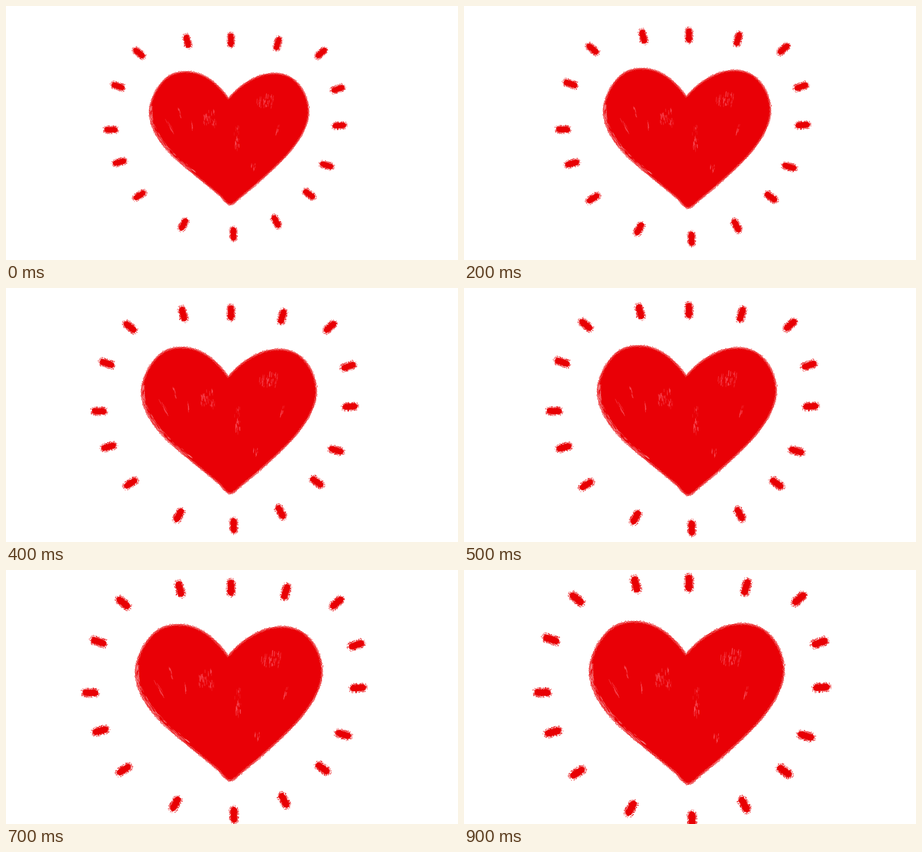
Animation of 768x432 px, one loop 1 s. Source, as an HTML page with a canvas:

```html
<!DOCTYPE html>
<html lang="en">
<head>
<meta charset="utf-8">
<title>Crayon heart</title>
<style>
  html, body { margin: 0; width: 100%; height: 100%; overflow: hidden; background: #fff; }
  canvas { display: block; width: 768px; height: 432px; }
</style>
</head>
<body>
<canvas id="stage" width="768" height="432"></canvas>
<script>
const ctx = document.getElementById('stage').getContext('2d');
const RED = '#e90006', PINK = '#ff7482', WHITE = '#fff';
const LOOP = 1000, STEP = 100, GROWTH = 0.0246;
const CX = 381.5, CY = 220;

const HEART = 'M378 158 C368 143 352 126 335 118.5 C320 111 301 110 286 115' +
  ' C265 122 247 151 244 178 C244 204 255 223 275 246' +
  ' C296 269 334 297 362 321 C370 328 374 337 381 338 C387 337 393 330 400 324' +
  ' C421 307 451 281 475 256 C494 235 513 208 514 182' +
  ' C515 158 502 133 484 122 C467 112 443 113 424 122 C405 130 387 146 378 158Z';

// Ray centres, clockwise from the top left
const RAYS = [
  [308, 60], [382, 58], [461.5, 64], [535.5, 80], [564, 141], [566.5, 203.5],
  [545, 271], [515, 320], [459, 366.5], [386.5, 387.5], [301.5, 371.5], [227, 322],
  [193, 265.5], [178.5, 210.5], [190.5, 136.5], [226, 80]
];

// Thinly coloured patches: x, y, width, height
const PATCHES = [
  [278, 206, 4, 28], [294, 181, 2, 18], [316, 206, 2, 20], [346, 192, 22, 32],
  [392, 226, 9, 44], [440, 163, 28, 26], [462, 210, 3, 24], [420, 274, 7, 14]
];

const outline = new Path2D(HEART);
const track = document.createElementNS('http://www.w3.org/2000/svg', 'path');
track.setAttribute('d', HEART);
const total = track.getTotalLength();

let seed;
function rnd() {
  seed = (seed * 1664525 + 1013904223) >>> 0;
  return seed / 4294967296;
}
const spread = size => (rnd() - .5) * size;

// Outline points with inward normals
const rim = Array.from({ length: 850 }, (_, i) => {
  const at = i / 850 * total;
  const a = track.getPointAtLength(at);
  const b = track.getPointAtLength((at + 1) % total);
  const d = Math.hypot(b.x - a.x, b.y - a.y) || 1;
  return { x: a.x, y: a.y, nx: (b.y - a.y) / d, ny: (a.x - b.x) / d, at };
});
const wornSide = rim.filter(p => p.at > 180 && p.at < 320);

function grain(x, y) {
  ctx.fillRect(x - .45, y - .45, .9, .9);
}

function line(x1, y1, x2, y2, width) {
  ctx.lineWidth = width;
  ctx.beginPath();
  ctx.moveTo(x1, y1);
  ctx.lineTo(x2, y2);
  ctx.stroke();
}

function drawRim() {
  for (const p of rim) {
    for (let k = 0; k < 3; k++) {
      const out = k < 2;
      const d = out ? -2.2 * rnd() * rnd() : 1.5 * rnd();
      ctx.fillStyle = out ? RED : WHITE;
      ctx.globalAlpha = out ? .8 : .4;
      grain(p.x + p.nx * d, p.y + p.ny * d);
    }
  }
}

// Worn strokes along the lower left side
function drawWorn() {
  ctx.strokeStyle = '#ffd0d4';
  for (let i = 0; i < 90; i++) {
    const p = wornSide[Math.floor(rnd() * wornSide.length)];
    const d = rnd() * 5, len = 3 + rnd() * 6;
    const x = p.x + p.nx * d, y = p.y + p.ny * d;
    ctx.globalAlpha = .25 + rnd() * .4;
    line(x, y, x - p.ny * len, y + p.nx * len, .7);
  }
}

// Short hairs, leaning inwards towards the sides of the heart
function drawPatch([x, y, w, h]) {
  const lean = ((CX - x) / 130) ** 3;
  ctx.strokeStyle = PINK;
  for (let i = 0; i < 6 + w * h / 22; i++) {
    const dy = spread(h - 4), len = 2 + rnd() * 6;
    const px = x + spread(w) + dy * lean, py = y + dy;
    ctx.globalAlpha = .2 + rnd() * .45;
    line(px, py - len / 2, px + len * lean, py + len / 2, .5 + rnd() * .7);
  }
}

// Rays point outwards; those near the top lean to the closer axis
function drawRay([x, y]) {
  const bearing = Math.atan2(y - CY, x - CX), half = 7;
  const lean = .22 * Math.max(0, -Math.sin(bearing)) * Math.sin(4 * bearing);
  ctx.save();
  ctx.translate(x, y);
  ctx.rotate(bearing - lean);
  ctx.globalAlpha = 1;
  ctx.strokeStyle = ctx.fillStyle = RED;
  line(-half, 0, half, 0, 8.6);
  ctx.globalAlpha = .8;
  for (let i = 0; i < 380; i++) {
    const u = Math.max(-1, Math.min(1, spread(3))) * half;
    const a = rnd() * Math.PI * 2, d = 3.8 + 3.6 * rnd() ** 1.3;
    grain(u + Math.cos(a) * d, Math.sin(a) * d);
  }
  ctx.restore();
}

function draw(step) {
  const s = 1 + GROWTH * step;
  seed = 77;
  ctx.setTransform(1, 0, 0, 1, 0, 0);
  ctx.globalAlpha = 1;
  ctx.fillStyle = WHITE;
  ctx.fillRect(0, 0, 768, 432);
  ctx.setTransform(s, 0, 0, s, CX * (1 - s), CY * (1 - s));
  ctx.lineCap = 'round';
  ctx.fillStyle = RED;
  ctx.fill(outline);
  drawRim();
  drawWorn();
  PATCHES.forEach(drawPatch);
  RAYS.forEach(drawRay);
}

let shown = -1;
function tick() {
  const step = Math.floor(performance.now() % LOOP / STEP);
  if (step !== shown) draw(shown = step);
  requestAnimationFrame(tick);
}
tick();
</script>
</body>
</html>
```
